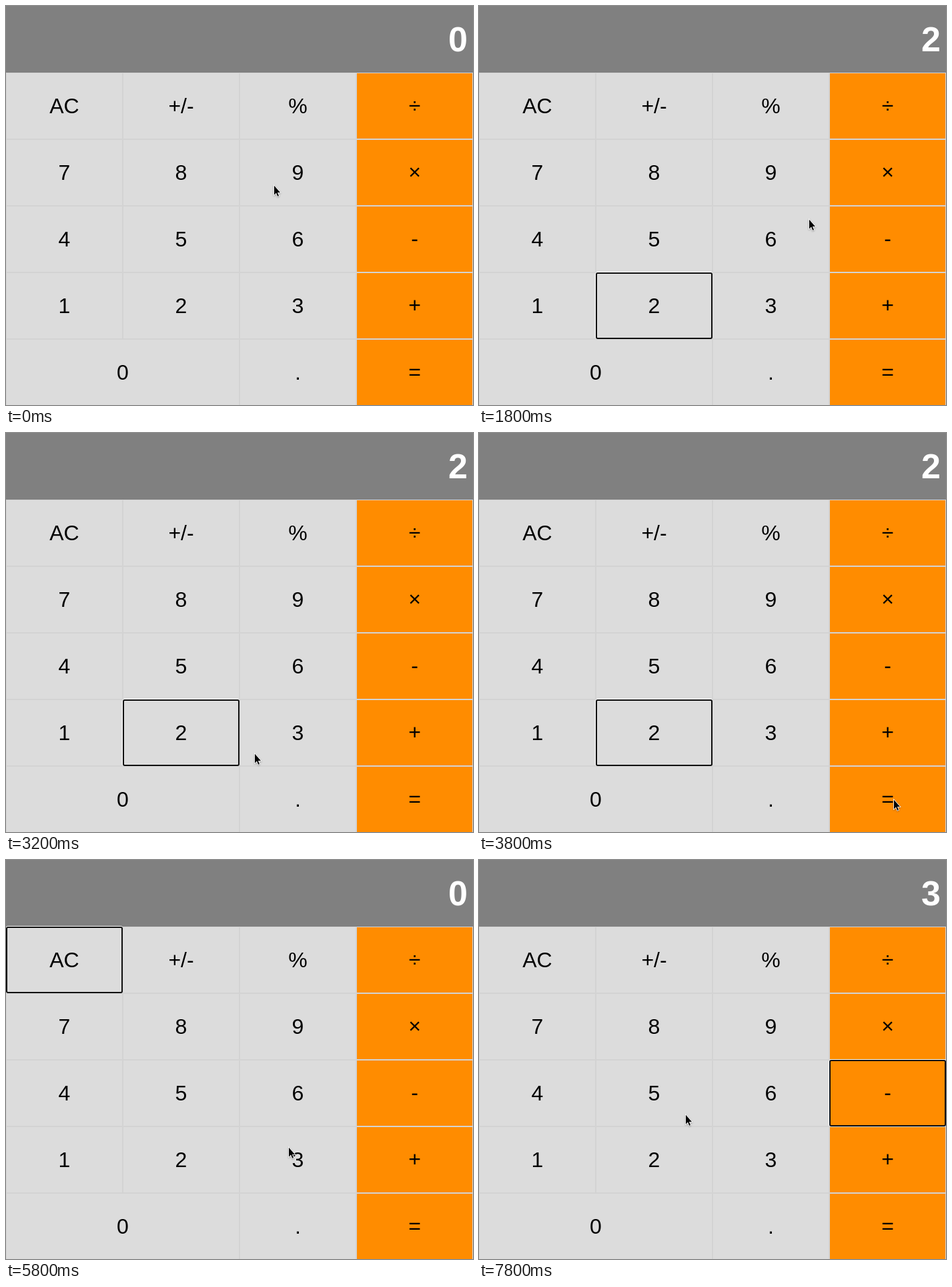
Animation, 700 px wide and 599 px high, one loop 8 s. Source, as an HTML page:

```html
<!DOCTYPE html>
<html lang="en">
<head>
<meta charset="utf-8">
<title>Calculator</title>
<style>
  html, body { margin: 0; width: 100%; height: 100%; overflow: hidden; }
  body { position: relative; background: #dcdcdc; font-family: "Liberation Sans", Arial, sans-serif; }
  #stage { position: absolute; left: 0; top: 0; width: 700px; height: 599px; overflow: hidden; }
  #display {
    box-sizing: border-box; height: 100px; padding-right: 8px;
    background: #808080; color: #fff;
    font-size: 52px; font-weight: bold; line-height: 100px; text-align: right;
  }
  #keys { display: grid; grid-template-columns: repeat(4, 175px); grid-auto-rows: 100px; }
  .key {
    box-sizing: border-box; border: 1px solid #d3d3d3; background: #dcdcdc; color: #000;
    font-size: 32px; line-height: 98px; text-align: center;
  }
  .op { background: #ff8c00; line-height: 96px; }
  .wide { grid-column: span 2; }
  #ring {
    position: absolute; left: 0; top: 0; box-sizing: border-box; width: 175px; height: 100px;
    border: 2px solid #101010; border-radius: 3px; box-shadow: 0 -1px #fff, -1px 0 #fff;
  }
  #cursor { position: absolute; left: 0; top: 0; overflow: visible; filter: drop-shadow(0 1px 1px rgba(0, 0, 0, .3)); }
</style>
</head>
<body>
<div id="stage">
  <div id="display">0</div>
  <div id="keys"></div>
  <div id="ring"></div>
  <svg id="cursor" width="13" height="21">
    <path d="M1 1.8V15.4L4 12.6L6.2 17.7L8 16.9L5.9 11.9H10Z"
      fill="#000" stroke="#fff" stroke-width="1.6" paint-order="stroke"/>
  </svg>
</div>
<script>
  const TICK = 100, LOOP = 80;   // ms per tick, ticks per loop
  const $ = id => document.getElementById(id);
  const keys = {};

  for (const label of 'AC +/- % ÷ 7 8 9 × 4 5 6 - 1 2 3 + 0 . ='.split(' ')) {
    const key = keys[label] = document.createElement('div');
    key.className = 'key' + ('÷×-+='.includes(label) ? ' op' : label === '0' ? ' wide' : '');
    key.textContent = label;
    $('keys').append(key);
  }

  // Pressed keys by tick.
  const presses = { 14: '2', 23: '×', 30: '2', 39: '=', 50: 'AC', 60: '3', 69: '-' };

  // Pointer strokes: start tick, end tick, x, y.
  const home = [401, 268];
  const strokes = [
    [0, 2, 275, 412], [3, 8, 251, 462], [15, 22, 612, 249],
    [23, 25, 458, 343], [28, 29, 282, 455], [31, 38, 621, 549],
    [41, 42, 607, 487], [43, 45, 113, 229], [46, 48, 99, 154],
    [52, 56, 375, 447], [57, 58, 423, 430], [61, 64, 573, 314],
    [65, 67, 609, 348], [70, 74, 446, 425], [75, 78, 309, 381]
  ];

  const easeOut = p => 1 - (1 - p) ** 2;

  function pointerAt(tick) {
    let [x, y] = home;
    for (const [from, to, toX, toY] of strokes) {
      if (tick <= from) break;
      const p = easeOut(Math.min(1, (tick - from) / (to - from)));
      x += (toX - x) * p;
      y += (toY - y) * p;
    }
    return [Math.round(x), Math.round(y)];
  }

  function calculatorAt(tick) {
    let shown = 0, stored = 0, focused = null;
    for (const [when, label] of Object.entries(presses)) {
      if (when > tick) break;
      focused = keys[label];
      if (label === 'AC') shown = 0;
      else if (label === '=') shown *= stored;
      else if (label >= '0' && label <= '9') shown = Number(label);
      else stored = shown;
    }
    return { shown, focused };
  }

  const place = (id, x, y) => { $(id).style.transform = `translate(${x}px, ${y}px)`; };

  const start = performance.now();
  function draw() {
    const tick = Math.floor(Math.max(0, performance.now() - start) / TICK) % LOOP;
    const { shown, focused } = calculatorAt(tick);
    $('display').textContent = shown;
    $('ring').hidden = !focused;
    if (focused) place('ring', focused.offsetLeft, focused.offsetTop);
    place('cursor', ...pointerAt(tick));
    requestAnimationFrame(draw);
  }
  draw();
</script>
</body>
</html>
```
